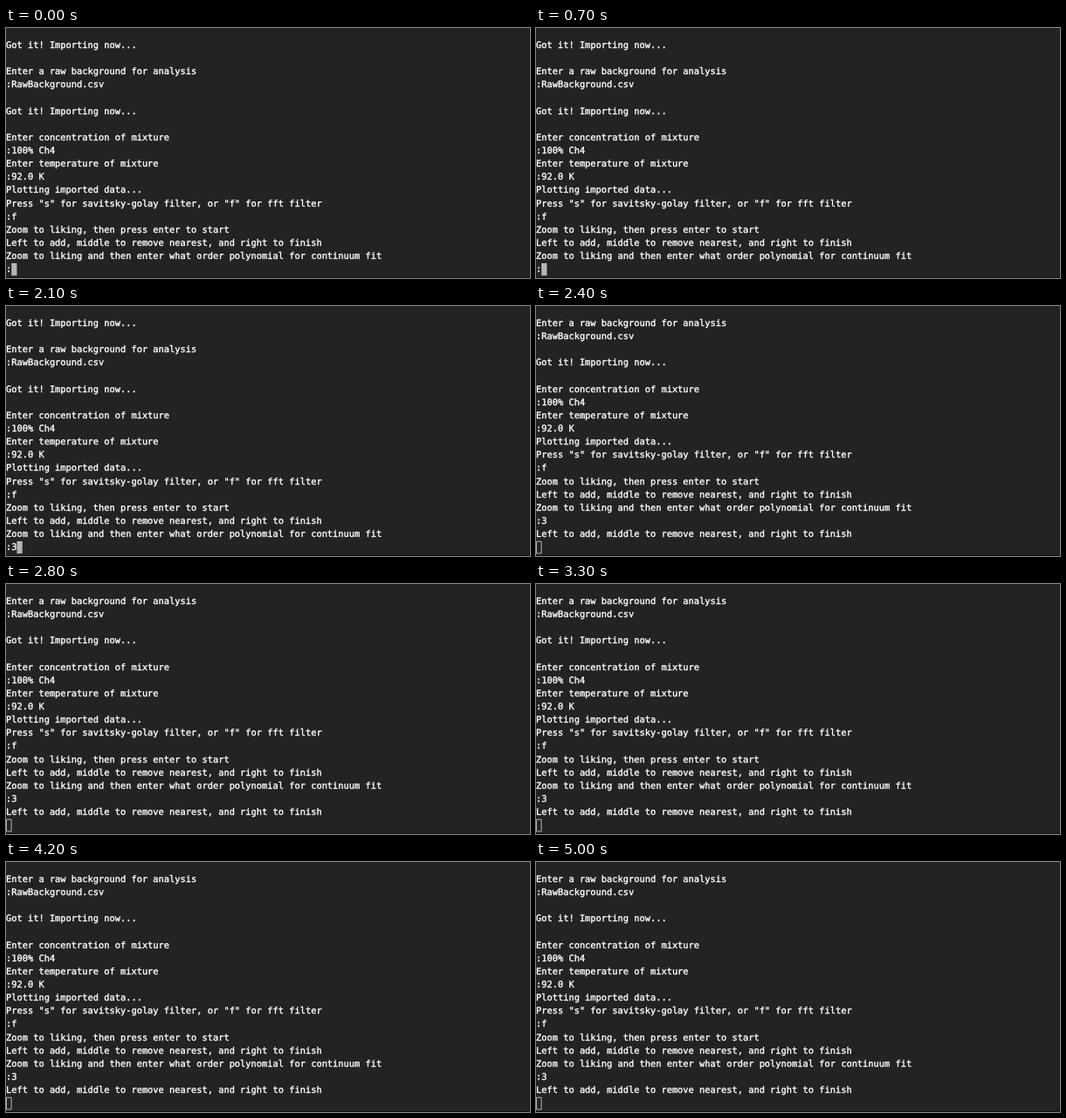
An HTML page with a canvas that plays this animation: 600x287 px, repeating every 5.1 s.

```html
<!DOCTYPE html>
<html lang="en">
<head>
<meta charset="utf-8">
<title>Terminal session</title>
<style>
  html, body { margin: 0; width: 100%; height: 100%; overflow: hidden; background: #242223; }
  canvas { display: block; }
</style>
</head>
<body>
<canvas id="stage" width="600" height="287"></canvas>
<script>
const ctx = document.getElementById('stage').getContext('2d');

const LOOP = 5100, TYPED_AT = 900, SCROLLED_AT = 2400;
const CELL = 6.235, PITCH = 15.13, FIRST_BASELINE = 23, ROWS = 18;

const log = [
  'Got it! Importing now...',
  '',
  'Enter a raw background for analysis',
  ':RawBackground.csv',
  '',
  'Got it! Importing now...',
  '',
  'Enter concentration of mixture',
  ':100% Ch4',
  'Enter temperature of mixture',
  ':92.0 K',
  'Plotting imported data...',
  'Press "s" for savitsky-golay filter, or "f" for fft filter',
  ':f',
  'Zoom to liking, then press enter to start',
  'Left to add, middle to remove nearest, and right to finish',
  'Zoom to liking and then enter what order polynomial for continuum fit'
];

function linesAt(time) {
  if (time < TYPED_AT) return [...log, ':'];
  if (time < SCROLLED_AT) return [...log, ':3'];
  return [...log, ':3', 'Left to add, middle to remove nearest, and right to finish', ''];
}

// A thin outline gives the regular face its heavier screen weight.
function drawLine(text, row) {
  const y = FIRST_BASELINE + row * PITCH;
  [...text].forEach((char, column) => {
    ctx.fillText(char, column * CELL, y);
    ctx.strokeText(char, column * CELL, y);
  });
}

function drawCursor(column, focused) {
  const x = column * CELL;
  ctx.fillStyle = ctx.strokeStyle = '#b5b5b5';
  ctx.lineWidth = 1;
  if (focused) ctx.fillRect(x, 270, CELL, 14.2);
  else ctx.strokeRect(x + 0.5, 270.3, 5.6, 13.7);
}

function draw(time) {
  ctx.fillStyle = '#242223';
  ctx.fillRect(0, 0, 600, 287);
  ctx.fillStyle = '#121112';
  ctx.fillRect(0, 286, 600, 1);

  ctx.font = '10.4px "DejaVu Sans Mono", monospace';
  ctx.textRendering = 'geometricPrecision';
  ctx.fillStyle = ctx.strokeStyle = '#fff';
  ctx.lineWidth = 0.35;
  ctx.lineJoin = 'round';
  const visible = linesAt(time).slice(-ROWS);
  visible.forEach(drawLine);
  drawCursor(visible[ROWS - 1].length, time < SCROLLED_AT);
}

const start = performance.now();
function tick() {
  draw((performance.now() - start) % LOOP);
  requestAnimationFrame(tick);
}
tick();
</script>
</body>
</html>
```
